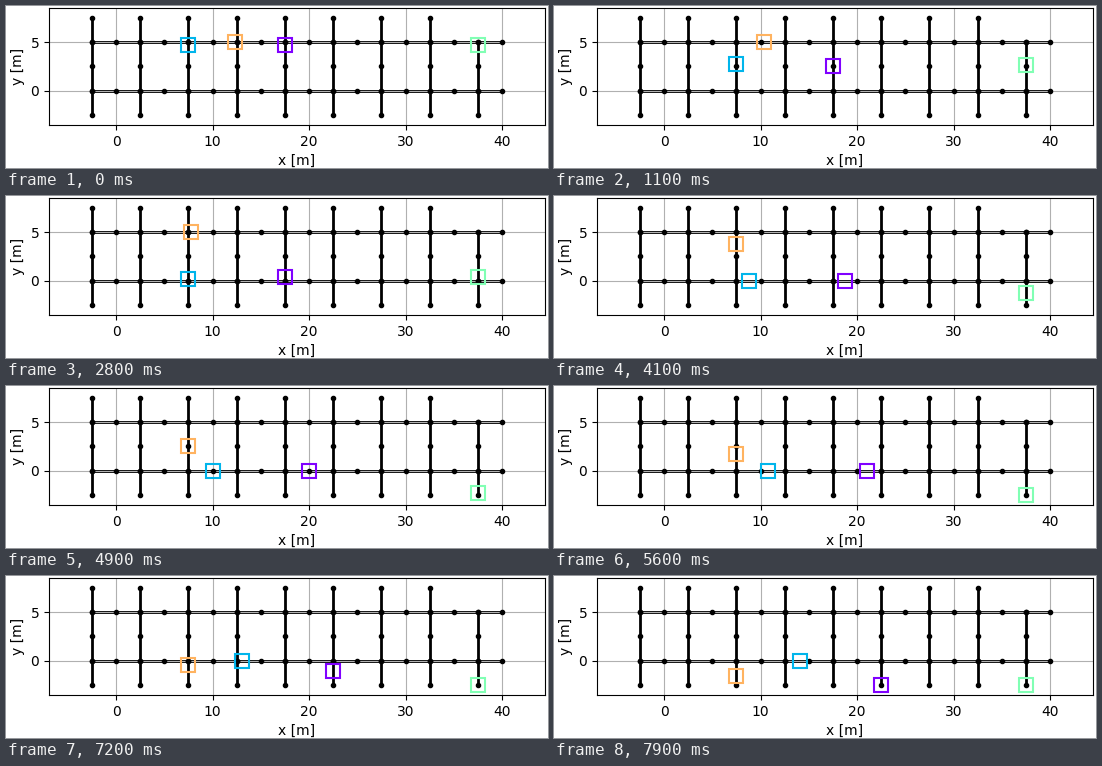
These frames come from a looping animation (542 by 162 pixels, 8 s). A matplotlib script:

```python
import matplotlib.pyplot as plt
import numpy as np
from matplotlib.animation import FuncAnimation

W, H, DPI = 542, 162, 100
STEP, FRAMES = 100, 80
SCALE = 9.65                      # pixels per metre
LEFT, RIGHT, TOP, BOTTOM = 43, 539, 1.95, 118.95

# Key points (frame, x, y) of each vehicle, by its place on the colour map
ROUTES = {
    0.00: [(1, 17.5, 4.7), (11, 17.5, 2.55), (31, 17.5, 0), (33, 17.5, 0),
           (49, 20, 0), (63, 22.5, 0), (65, 22.5, 0), (79, 22.5, -2.5)],
    0.25: [(1, 7.5, 4.7), (11, 7.5, 2.8), (29, 7.5, 0), (33, 7.5, 0),
           (49, 10, 0), (79, 14.1, 0)],
    0.50: [(1, 37.5, 4.7), (11, 37.5, 2.65), (31, 37.5, 0),
           (50, 37.5, -2.5)],
    0.75: [(1, 12.3, 5), (11, 10.35, 5), (30, 7.5, 5), (33, 7.5, 5),
           (49, 7.5, 2.5), (79, 7.5, -1.55)],
}


def draw_track(ax):
    for y in (0, 5):
        ax.plot([-2.5, 40], [y, y], color="k", lw=2)
        ax.plot([-2.5, 40], [y, y], color="w", lw=0.5)
        xs = np.arange(-2.5, 40.1, 2.5)
        ax.plot(xs, np.full(xs.size, y), "k.", ms=6)
    for x in np.arange(-2.5, 38, 5):
        top = 5 if x > 35 else 7.5
        ys = np.arange(-2.5, top + 0.1, 2.5)
        ax.plot(np.full(ys.size, x), ys, "k.-", lw=2, ms=6)


fig = plt.figure(figsize=(W / DPI, H / DPI), dpi=DPI, facecolor="w")
ax = fig.add_axes([LEFT / W, 1 - BOTTOM / H,
                   (RIGHT - LEFT) / W, (BOTTOM - TOP) / H])
draw_track(ax)
half_w = (RIGHT - LEFT) / 2 / SCALE
half_h = (BOTTOM - TOP) / 2 / SCALE
ax.set(xlim=(18.75 - half_w, 18.75 + half_w),
       ylim=(2.5 - half_h, 2.5 + half_h),
       xticks=range(0, 41, 10), yticks=(0, 5),
       xlabel="x [m]", ylabel="y [m]")
ax.grid(True)

vehicles = [ax.plot([], [], "s", ms=10, mfc="none", mew=1.5,
                    mec=plt.cm.rainbow(shade), zorder=4)[0]
            for shade in ROUTES]


def update(frame):
    # Vehicles move in five of every eight frames and hold in the others
    held = 5 * (frame + 1) % 8 > 4
    for marker, route in zip(vehicles, ROUTES.values()):
        t, x, y = np.transpose(route)
        marker.set_data([np.interp(frame - held, t, x)],
                        [np.interp(frame - held, t, y)])
    return vehicles


anim = FuncAnimation(fig, update, frames=FRAMES, interval=STEP,
                     init_func=lambda: update(0), repeat=True)
plt.show()
```
